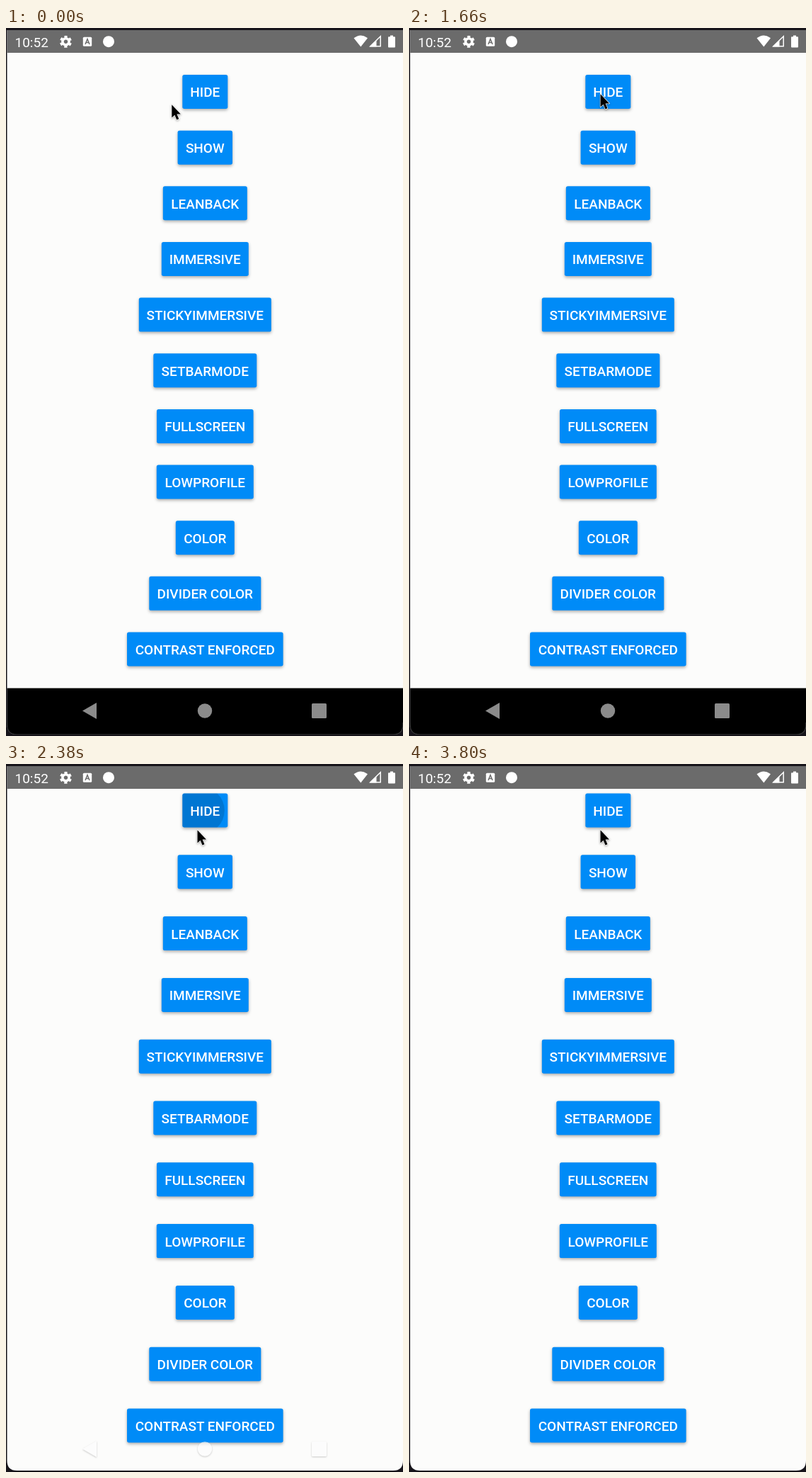
Write an HTML page that moves like this. It is 561 by 999 pixels and loops after 3.82 s.

```html
<!DOCTYPE html>
<html lang="en">
<head>
<meta charset="utf-8">
<title>System bars</title>
<style>
html, body { margin: 0; width: 100%; height: 100%; overflow: hidden; background: #17141a; }
svg { display: block; width: 561px; height: 999px; }
text { font-family: Roboto, sans-serif; fill: #fff; }
.label { font-size: 19px; font-weight: 500; text-anchor: middle; }
.shadow { filter: drop-shadow(0 2px 2px rgba(0, 0, 0, .32)); }
#ghost { filter: drop-shadow(0 1px 1px rgba(0, 0, 0, .3)); }
#cursor { filter: drop-shadow(0 1.5px 1.5px rgba(0, 0, 0, .35)); }
</style>
</head>
<body>
<svg viewBox="0 0 561 999">
  <defs>
    <clipPath id="screen"><path d="M1.5 3H561V983Q561 997 547 997H15.500Q1.500 997 1.500 983Z"/></clipPath>
    <clipPath id="face"><rect id="faceRect" x="249.300" width="64" height="48" rx="2.700"/></clipPath>
    <g id="navIcons">
      <path d="M108 963.500L128 952V975Z"/>
      <circle cx="281" cy="963.500" r="10.200"/>
      <rect x="432" y="953" width="21" height="21" rx="1.500"/>
    </g>
  </defs>

  <rect width="561" height="999" fill="#17141a"/>
  <g clip-path="url(#screen)">
    <rect width="561" height="999" fill="#fcfcfb"/>
    <g id="buttons"></g>
    <g clip-path="url(#face)"><circle id="ripple"/></g>
    <g id="labels"></g>
    <g id="nav">
      <rect y="931.500" width="561" height="68" fill="#000"/>
      <use href="#navIcons" fill="#8b8b8b"/>
      <path d="M1.500 980V983Q1.500 997 15.500 997H547Q561 997 561 983V980" fill="none" stroke="#333" stroke-width="1.500"/>
    </g>
    <g id="ghost"><use href="#navIcons" fill="#fdfdfd"/></g>
    <rect width="561" height="35" fill="#6b6b6b"/>
  </g>

  <text x="12.500" y="26.500" font-size="19">10:52</text>
  <g transform="translate(84.500 19.300)" fill="none" stroke="#fff">
    <circle r="4.600" stroke-width="3.600"/>
    <circle r="7" stroke-width="3" stroke-dasharray="4 3.330" transform="rotate(-106.400)"/>
  </g>
  <rect x="108.800" y="12.800" width="12.400" height="13" rx="1.500" fill="#fff"/>
  <path d="M112 23L115 15.500L118 23M113 20.500H117" fill="none" stroke="#6b6b6b" stroke-width="1.500"/>
  <circle cx="145" cy="19.200" r="8" fill="#fff"/>
  <g fill="#fff">
    <path d="M491.500 14.300Q501.300 6.500 511 14.300L501.300 26.500Z"/>
    <path d="M514 26.500L523.500 17V26.500Z"/>
    <path d="M514.800 25.700L529.200 11.800V25.700Z" fill="none" stroke="#fff" stroke-width="1.500"/>
    <path d="M543 10.500H547V12.300H549Q550 12.300 550 13.500V26.300Q550 27.500 549 27.500H541Q540 27.500 540 26.300V13.500Q540 12.300 541 12.300H543Z"/>
  </g>

  <path id="cursor" d="M0 0V18.200L4.100 14.400L7 21.300L10 20L7.100 13.200H12.600Z" fill="#000" stroke="#fff" stroke-width="1.300" stroke-linejoin="round" paint-order="stroke"/>
</svg>
<script>
const LOOP = 3820;
const MID = 281.3;
const HEIGHT = 48;
const BUTTONS = [
  ['HIDE', 64], ['SHOW', 77.4], ['LEANBACK', 119], ['IMMERSIVE', 123],
  ['STICKYIMMERSIVE', 187], ['SETBARMODE', 146], ['FULLSCREEN', 136.6],
  ['LOWPROFILE', 137], ['COLOR', 83], ['DIVIDER COLOR', 158], ['CONTRAST ENFORCED', 220.6]
];

const $ = id => document.getElementById(id);
const clamp = v => Math.max(0, Math.min(1, v));
const ramp = (n, from, to) => clamp((n - from) / (to - from));
const smooth = p => p * p * (3 - 2 * p);

function add(parent, tag, attrs) {
  const el = document.createElementNS('http://www.w3.org/2000/svg', tag);
  for (const key in attrs) el.setAttribute(key, attrs[key]);
  return parent.appendChild(el);
}

const rows = BUTTONS.map(([name, width]) => {
  const rect = add($('buttons'), 'rect', {
    x: MID - width / 2, width, height: HEIGHT, rx: 2.7, fill: '#008bf7', class: 'shadow'
  });
  const label = add($('labels'), 'text', { x: MID, class: 'label' });
  label.textContent = name;
  return { rect, label };
});

// Ticks come in threes every 140 ms, lasting 20, 20 and 100 ms.
function tickAt(t) {
  const u = t + 20;
  const rest = u % 140;
  return Math.floor(u / 140) * 3 + (rest < 20 ? 0 : rest < 40 ? 1 : 2);
}

function layout(top, step) {
  rows.forEach(({ rect, label }, i) => {
    const y = top + i * step;
    rect.setAttribute('y', y);
    label.setAttribute('y', y + 31.4);
  });
  $('faceRect').setAttribute('y', top);
}

function drawRipple(n, top) {
  const p = ramp(n, 48, 56);
  const grow = 1 - (1 - p) ** 2;
  const el = $('ripple');
  el.setAttribute('cx', 271 + 8 * p);
  el.setAttribute('cy', top + HEIGHT / 2);
  el.setAttribute('r', 12 + 29 * grow);
  el.setAttribute('fill-opacity', n < 49 ? 0 : 0.15 * (1 - ramp(n, 56, 70)));
}

function draw(t) {
  const n = tickAt(t);
  const hidden = n >= 51;
  const top = hidden ? 41.5 : 66;
  layout(top, hidden ? 86.8 : 78.65);
  drawRipple(n, top);

  $('nav').setAttribute('visibility', hidden ? 'hidden' : 'visible');
  const ghost = $('ghost');
  ghost.setAttribute('opacity', hidden ? 1 - ramp(n, 51, 54) : 0);
  ghost.setAttribute('transform', `translate(0 ${3 * Math.max(0, n - 51) ** 1.5})`);

  const reach = smooth(ramp(n, 2, 16));
  const settle = smooth(ramp(n, 22, 32));
  const x = 234.3 + 27.5 * reach + 8.7 * settle;
  const y = 108.3 - 14.3 * reach - 0.7 * settle;
  $('cursor').setAttribute('transform', `translate(${x} ${y})`);
}

const start = performance.now();
function loop() {
  draw((performance.now() - start) % LOOP);
  requestAnimationFrame(loop);
}
draw(0);
requestAnimationFrame(loop);
</script>
</body>
</html>
```
